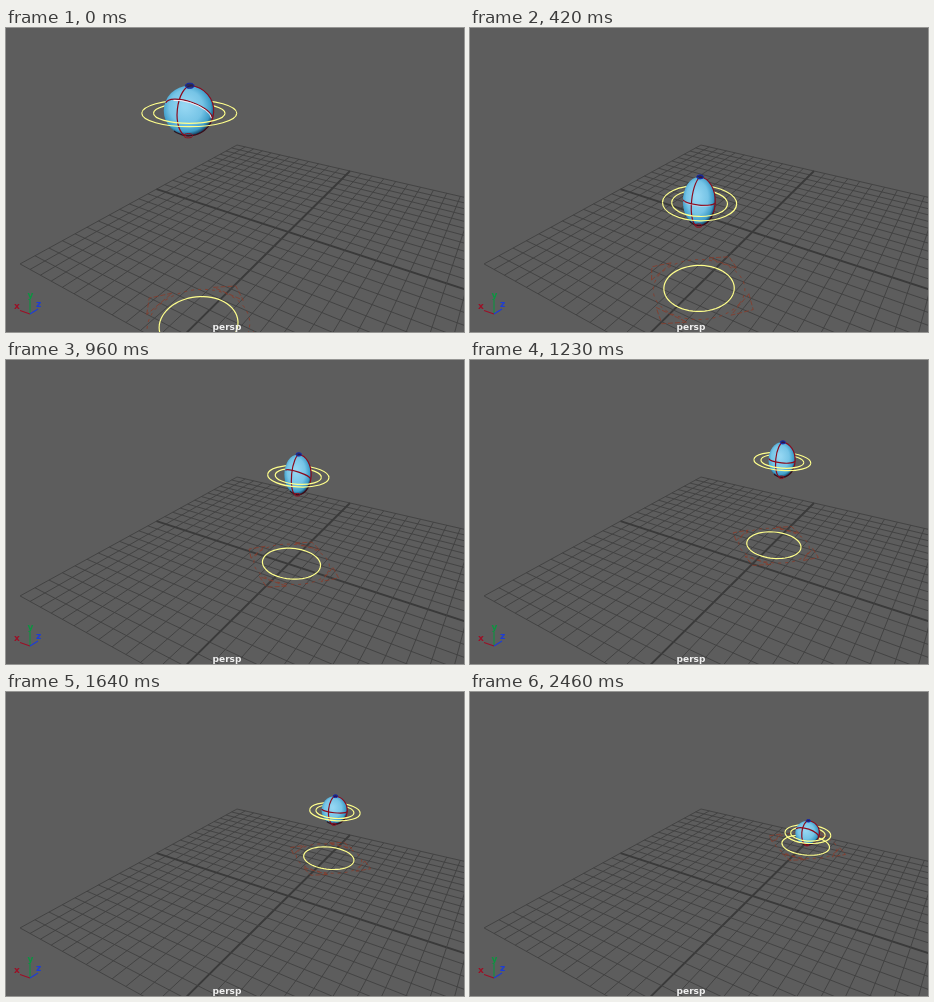
An HTML page with a canvas for the animation above (2590 ms loop, 458 by 304 pixels).

```html
<!DOCTYPE html>
<html lang="en">
<head>
<meta charset="utf-8">
<title>Bouncing ball</title>
<style>
  html, body { margin: 0; width: 100%; height: 100%; overflow: hidden; background: #5d5d5d; }
  canvas, svg { position: absolute; left: 0; top: 0; width: 458px; height: 304px; }
  text { font: bold 9px "DejaVu Sans", sans-serif; text-anchor: middle; }
</style>
</head>
<body>
<canvas id="floor" width="458" height="304"></canvas>
<canvas id="rig" width="458" height="304"></canvas>
<svg viewBox="0 0 458 304">
  <g fill="none" stroke-width="1.1">
    <path d="M24 286V272" stroke="#0c9440"/>
    <path d="M24 286L14 282.500" stroke="#9c1026"/>
    <path d="M24 286L32 281" stroke="#1c3cd8"/>
  </g>
  <text x="24.500" y="270" fill="#0c9440">y</text>
  <text x="11" y="281" fill="#9c1026">x</text>
  <text x="32.500" y="279" fill="#1c3cd8">z</text>
  <text x="221" y="301.500" fill="#f0f0f0">persp</text>
</svg>
<script>
const LOOP = 2590, TICK = 2460 / 36, TAU = Math.PI * 2;
const YELLOW = '#ffff8c', RED = '#8c0a1c', RUST = '#8a3c2a';
const floor = document.getElementById('floor').getContext('2d');
const c = document.getElementById('rig').getContext('2d');

// Floor plane (0..1 each way) to screen.
function project(p, q) {
  const w = 1 - 0.265 * p - 0.41 * q;
  return [(134.8 * p - 222.7 * q + 231) / w, (14.1 * p + 22.2 * q + 117) / w];
}

function trace(ctx, pts, close) {
  ctx.beginPath();
  pts.forEach(([x, y]) => ctx.lineTo(x, y));
  if (close) ctx.closePath();
}

function drawFloor() {
  const cells = 24;
  for (let i = 0; i <= cells; i++) {
    const k = i / cells, axis = i === cells / 2;
    floor.strokeStyle = axis ? '#3a3a3a' : '#414141';
    floor.lineWidth = axis ? 1.9 : 0.9;
    for (const line of [[project(k, 0), project(k, 1)], [project(0, k), project(1, k)]]) {
      trace(floor, line);
      floor.stroke();
    }
  }
}

// Smooth curve through [u, value] keys.
function curve(keys, u) {
  let i = 0;
  while (i < keys.length - 2 && u > keys[i + 1][0]) i++;
  const slope = j => {
    const a = keys[Math.max(j - 1, 0)], b = keys[Math.min(j + 1, keys.length - 1)];
    return (b[1] - a[1]) / (b[0] - a[0]);
  };
  const [u0, v0] = keys[i], [u1, v1] = keys[i + 1], d = u1 - u0, t = (u - u0) / d;
  const e = t * t * (3 - 2 * t);
  return v0 + (v1 - v0) * e + d * t * (1 - t) * (slope(i) * (1 - t) - slope(i + 1) * t);
}

const TRAVEL = [[0, 0.918], [4, 0.815], [9, 0.62], [15, 0.365], [20, 0.215], [24, 0.125], [30, 0.097]];
const BOW = [[0, 1], [4, -0.6], [9, 1], [15, -0.5], [20, -0.5], [24, -0.2], [30, 0.9]];
// Each hop: landing time, apex time, apex height.
const HOPS = [[6.44, 0, 4.92], [13.4, 9.92, 3.96], [18, 15.7, 2.9], [25.4, 21.7, 1.76], [30, 27.7, 0.7]];

function hop(u) {
  const [land, apex, top] = HOPS.find(h => u <= h[0]);
  const half = land - apex, d = (u - apex) / half;
  return { lift: top * (1 - d * d), speed: Math.abs(2 * top * d / half) };
}

function drawBase(q) {
  const p = 0.504, r = 0.082;
  const at = (a, k) => project(p + r * k * Math.cos(a), q + r * k * Math.sin(a));
  const circle = k => Array.from({ length: 60 }, (_, i) => at(i / 60 * TAU, k));

  c.strokeStyle = RUST;
  c.lineWidth = 0.8;
  c.setLineDash([3, 4]);
  trace(c, circle(1.3), true);
  c.stroke();
  c.setLineDash([5, 2]);
  for (let i = 0; i < 4; i++) {
    const a = i * TAU / 4;
    trace(c, [at(a - 0.36, 1.42), at(a, 1.72), at(a + 0.36, 1.42)], true);
    c.stroke();
  }
  c.setLineDash([]);

  const ring = circle(1);
  c.strokeStyle = YELLOW;
  c.lineWidth = 1.2;
  trace(c, ring, true);
  c.stroke();

  const range = n => {
    const v = ring.map(pt => pt[n]);
    return [Math.min(...v), Math.max(...v)];
  };
  const [x0, x1] = range(0), [y0, y1] = range(1);
  return { x: (x0 + x1) / 2, y: (y0 + y1) / 2, size: (x1 - x0) / 2 };
}

function arc(x, y, rx, ry, tilt, from, to, color, width) {
  c.beginPath();
  c.ellipse(x, y, rx, ry, tilt, from, to);
  c.strokeStyle = color;
  c.lineWidth = width;
  c.stroke();
}

function drawBall(u, base) {
  const { lift, speed } = hop(u);
  const air = Math.min(1, lift * 2);
  const stretch = Math.min(0.25, 0.28 * speed * speed) * air - (speed > 0.7 ? 0.2 * (1 - air) : 0);
  const rise = lift + 0.52 * (1 + Math.min(0, stretch));
  const zoom = 1 + 0.00125 * base.size * rise;
  const x = 229 + (base.x - 229) * zoom, y = base.y - base.size * rise;
  const r = base.size * 0.5 * zoom, rx = r * (1 - 0.68 * stretch), ry = r * (1 + stretch);
  const tilt = (x - 182) * 0.0005, flat = 0.284 + 0.0021 * (y - 83);

  const rings = (from, to) => [1.9, 1.43].forEach(k =>
    arc(x + 0.5, y + r * 0.1, r * k, r * k * flat, tilt, from, to, YELLOW, 1.2));

  rings(Math.PI, TAU);

  c.save();
  c.translate(x, y);
  c.scale(rx, ry);
  c.beginPath();
  c.arc(0, 0, 1, 0, TAU);
  const skin = c.createRadialGradient(-0.15, -0.2, 0.1, -0.08, -0.12, 1.13);
  skin.addColorStop(0, '#94d6f2');
  skin.addColorStop(0.55, '#76c4e6');
  skin.addColorStop(0.85, '#3d9cc8');
  skin.addColorStop(1, '#123c58');
  c.fillStyle = skin;
  c.fill();
  c.restore();

  // Control curves wrapped around the ball.
  arc(x, y, rx, ry, 0, -1.5, 1.7, RED, 1.1);
  arc(x, y, rx, ry, 0, 0.5, 2.2, '#2c1420', 1.2);
  arc(x, y, rx * 0.46, ry, 0.1, Math.PI / 2, Math.PI * 1.5, RED, 1.2);
  const bow = curve(BOW, u) * 0.36;
  const turn = bow > 0 ? 0.33 : 0.1;
  const from = bow > 0 ? Math.PI : 0;
  const shine = Math.max(0, 1 - u / 8);
  arc(x, y, rx * 0.97, ry * Math.abs(bow), turn, from, from + Math.PI, RED, 1.2);
  if (shine) arc(x, y + 1, rx * 0.95, ry * Math.abs(bow), turn, from + 0.7, from + 3, `rgba(255,235,240,${shine})`, 1);

  const knob = Math.max(2, r * 0.17);
  c.fillStyle = 'rgba(16,24,80,0.7)';
  c.beginPath();
  c.ellipse(x + 1, y - ry, knob, knob * 0.6, 0, 0, TAU);
  c.fill();
  arc(x + 1, y - ry, knob, knob * 0.6, 0, 0, TAU, '#1224b0', 1);
  arc(x - 0.5, y + ry, knob, knob * 0.5, 0, 0, TAU, '#8c1020', 1);

  rings(0, Math.PI);
}

function draw(ms) {
  const tick = Math.min(36, Math.floor((ms + 7) / TICK));
  // Every fifth tick holds the pose.
  const u = tick - Math.min(6, Math.max(0, Math.floor((tick - 1) / 5)));
  c.clearRect(0, 0, 458, 304);
  drawBall(u, drawBase(curve(TRAVEL, u)));
}

drawFloor();
draw(0);
const start = performance.now();
function loop() {
  draw((performance.now() - start) % LOOP);
  requestAnimationFrame(loop);
}
requestAnimationFrame(loop);
</script>
</body>
</html>
```
